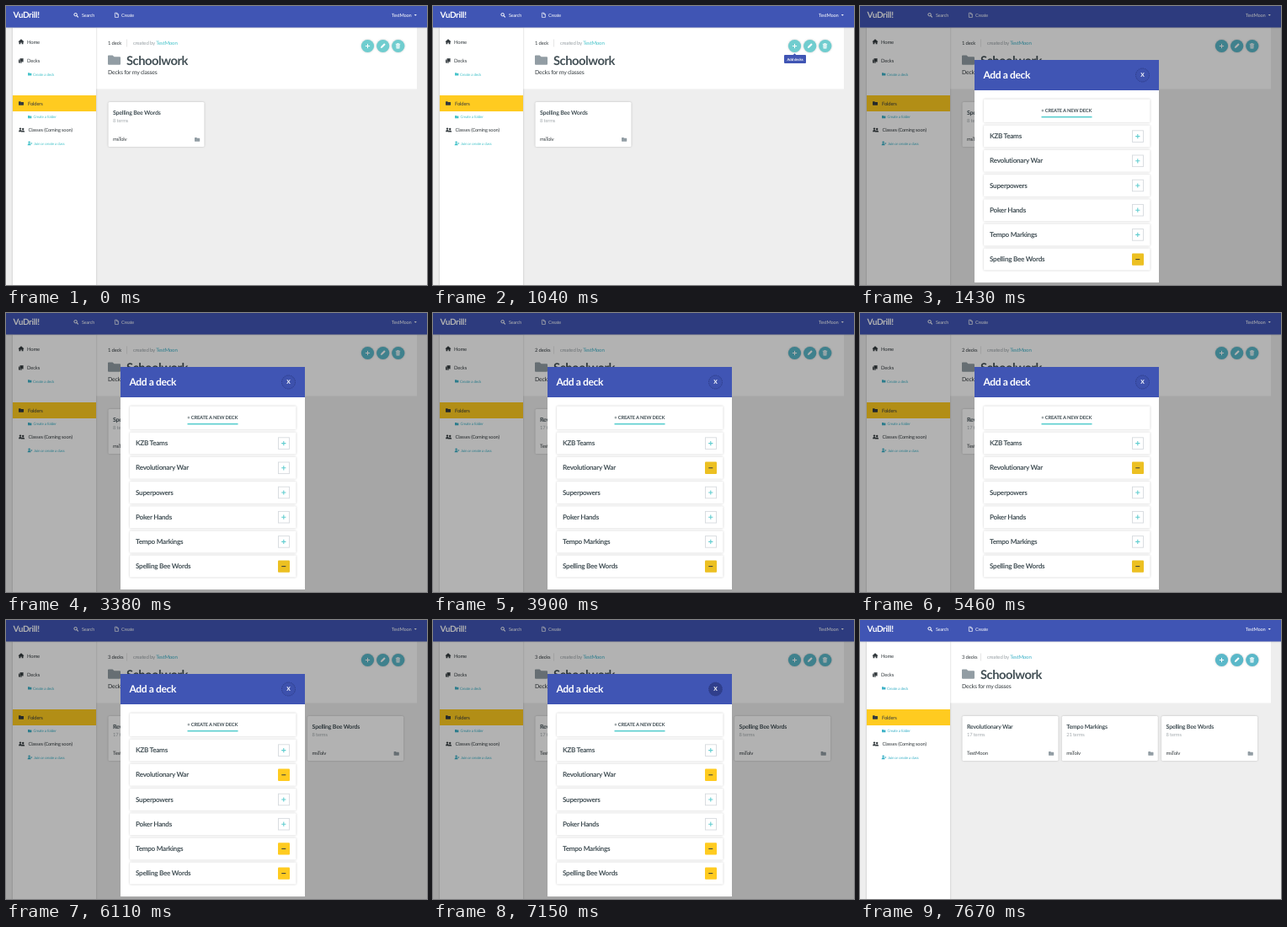
These frames come from a looping animation (500x331 px, 9750 ms). An HTML page:

```html
<!DOCTYPE html>
<html lang="en">
<head>
<meta charset="utf-8">
<title>Add decks to a folder</title>
<style>
  html, body { margin: 0; width: 100%; height: 100%; overflow: hidden; background: #eee; }
  svg { display: block; width: 100%; height: 100%; }
  text {
    font-family: Lato, sans-serif;
    letter-spacing: -.03em;
    text-rendering: geometricPrecision;
  }
</style>
</head>
<body>
<svg id="stage" viewBox="0 0 500 331"></svg>
<script>
const LOOP = 9750;
const BLUE = '#4055b4', INK = '#333a3e', SLATE = '#435056', GRAY = '#929da4', YELLOW = '#ffcb20';
const USER = 'TestMoon', AUTHOR = 'msTolv';

const DECKS = {
  war: { title: 'Revolutionary War', terms: 17, author: USER },
  tempo: { title: 'Tempo Markings', terms: 21, author: AUTHOR },
  bee: { title: 'Spelling Bee Words', terms: 8, author: AUTHOR }
};
const CHOICES = ['KZB Teams', 'Revolutionary War', 'Superpowers', 'Poker Hands',
  'Tempo Markings', 'Spelling Bee Words'];

function stateAt(t) {
  return {
    tooltip: t >= 1040 && t < 1430,
    modal: t >= 1430 && t < 7670,
    closeHover: t >= 7150,
    decks: t < 3510 ? ['bee'] : t < 5590 ? ['war', 'bee'] : ['war', 'tempo', 'bee'],
    teal: t < 1430 ? '#70cdcf' : '#5ab8c9',
    link: t < 1430 ? '#46c3ca' : '#3eb2c8',
    minus: t < 5980 ? '#ecc022' : YELLOW
  };
}

// Drawing helpers
const rect = (x, y, w, h, fill, extra = '') =>
  `<rect x="${x}" y="${y}" width="${w}" height="${h}" fill="${fill}" ${extra}/>`;
const circle = (x, y, r, fill, extra = '') =>
  `<circle cx="${x}" cy="${y}" r="${r}" fill="${fill}" ${extra}/>`;
const line = (d, color, width = 1) =>
  `<path d="${d}" fill="none" stroke="${color}" stroke-width="${width}"/>`;
const shape = (d, fill) => `<path d="${d}" fill="${fill}"/>`;
const text = (x, y, str, size, fill, weight = 400, anchor = 'start') =>
  `<text x="${x}" y="${y}" font-size="${size}" fill="${fill}" font-weight="${weight}" text-anchor="${anchor}">${str}</text>`;
const folder = (x, y, width, fill) =>
  `<path transform="translate(${x} ${y}) scale(${width / 16})" fill="${fill}" d="M1 0h5l2 2h7q1 0 1 1v8q0 1-1 1H1q-1 0-1-1V1q0-1 1-1z"/>`;
const plus = (x, y, r, color, width) =>
  line(`M${x - r} ${y}h${2 * r}M${x} ${y - r}v${2 * r}`, color, width);
const person = (x, y, fill) =>
  circle(x, y, 1.2, fill) + shape(`M${x - 2} ${y + 3.6}q0-2.1 2-2.1t2 2.1z`, fill);
const shadowed = (...parts) =>
  `<g style="filter:drop-shadow(0 .5px 1px rgba(0,0,0,.22))">${parts.join('')}</g>`;

function topBar() {
  return shadowed(rect(0, 0, 500, 25.5, BLUE)) +
    text(8.5, 13.8, 'VuDrill!', 10, '#fff', 700) +
    circle(82.6, 10.2, 1.7, 'none', 'stroke="#fff"') + line('M83.8 11.4l2 2', '#fff', 1.1) +
    text(90, 12.8, 'Search', 5.5, '#fff') +
    line('M129.4 8.2h2.4l1.6 1.6v3.6h-4zM131.6 8.2v1.8h1.8', '#fff', .7) +
    text(137, 12.8, 'Create', 5.5, '#fff') +
    text(458, 12.8, USER, 5.7, '#fff') +
    shape('M484.8 10h3l-1.5 1.8z', '#fff');
}

function sidebar(s) {
  return shadowed(rect(8, 25.5, 99, 310, '#fff')) +
    rect(8, 106, 99, 19, YELLOW) +
    shape('M14.6 42.2l3.4-3 3.4 3-.5.5-.4-.3v2.8h-1.8v-1.8h-1.4v1.8h-1.8v-2.8l-.4.3z', INK) +
    text(25, 44.6, 'Home', 5.9, INK) +
    rect(15, 63.6, 4, 4, INK, 'rx=".5"') +
    rect(16.4, 62, 4.4, 4.4, INK, 'rx=".5" stroke="#fff" stroke-width=".4"') +
    text(25, 67, 'Decks', 5.9, INK) +
    folder(26, 79.2, 4.4, s.link) + text(32, 82.6, 'Create a deck', 4.5, s.link) +
    folder(15, 113.2, 6, INK) + text(26, 117.6, 'Folders', 5.9, INK) +
    folder(26, 130, 4.4, s.link) + text(32.5, 133.4, 'Create a folder', 4.5, s.link) +
    person(17, 145.6, INK) + person(20.2, 146, INK) +
    text(26.5, 149.4, 'Classes (Coming soon)', 5.75, INK) +
    person(27.6, 161.6, s.link) + plus(30.2, 163, 1, s.link, .6) +
    text(33, 165.2, 'Join or create a class', 4.4, s.link);
}

function header(s) {
  const count = s.decks.length;
  const pencil = shape('M444.9 50.1l.5-2 3.8-3.8 1.5 1.5-3.8 3.8z', '#fff');
  const trash = shape('M462.8 44.8h1.7l.4-.7h1.2l.4.7h1.7v.9h-5.4zM463.3 46.2h4.4l-.3 4.4h-3.8z', '#fff') +
    line('M464.7 47v2.8M466.3 47v2.8', s.teal, .5);
  return rect(107, 25.5, 381, 73, '#fff') +
    text(121, 46, `${count} deck${count > 1 ? 's' : ''}`, 5.9, INK) +
    line('M143.5 39.5v9', '#ddd', .7) +
    text(151, 46, 'created by', 6.05, '#98a0a5') +
    text(178.3, 46, USER, 6.1, s.link) +
    folder(121, 58.4, 15, GRAY) +
    text(143, 69.6, 'Schoolwork', 14.7, SLATE, 700) +
    text(121, 81, 'Decks for my classes', 6.95, INK) +
    shadowed(...[429.5, 447.7, 465.8].map(x => circle(x, 47.5, 7.6, s.teal))) +
    plus(429.5, 47.5, 2.6, '#fff', 1) + pencil + trash;
}

function card(deck, i) {
  const x = 121.5 + i * 118.3;
  return shadowed(rect(x, 114, 114, 53, '#fff', 'rx="1.5"')) +
    text(x + 5.5, 128.6, deck.title, 7, SLATE, 700) +
    text(x + 5.5, 138.2, `${deck.terms} terms`, 5.8, '#a5abaf') +
    text(x + 5.5, 160, deck.author, 6, INK) +
    folder(x + 102.5, 156, 6.2, GRAY);
}

function tooltip() {
  return shape('M427.5 58.2l2-2 2 2z', BLUE) +
    rect(417, 58, 26, 10, BLUE, 'rx="1"') +
    text(430, 64.6, 'Add decks', 4.4, '#fff', 700, 'middle');
}

function choice(title, i, s) {
  const y = 154.6 + i * 29.2;
  const added = s.decks.some(id => DECKS[id].title === title);
  const button = added
    ? rect(323, y - 7.2, 14, 14.4, s.minus, 'rx="1"') + line(`M327.3 ${y}h5`, INK, 1)
    : rect(323.5, y - 6.8, 13, 13.6, '#fff', 'stroke="#d6dade" stroke-width=".9"') +
      plus(329.8, y, 2.6, '#62cdd0', 1.1);
  return shadowed(rect(147, y - 13, 197.5, 26, '#fff', 'rx="1"')) +
    text(154, y + 2.6, title, 8.1, SLATE, 700) + button;
}

function modal(s) {
  return rect(0, 0, 500, 331, '#000', 'opacity=".3"') +
    rect(136, 64, 219, 264, '#fff') +
    rect(136, 64, 219, 36, BLUE) +
    text(146.5, 86, 'Add a deck', 12, '#fff', 700) +
    circle(335.5, 82, 8, s.closeHover ? '#303f8c' : '#3d51ad',
      'stroke="#2b397f" stroke-width=".8" stroke-dasharray="1.5 1"') +
    text(335.5, 84.4, 'X', 6.8, '#fff', 700, 'middle') +
    shadowed(rect(147, 110.5, 197.5, 27.5, '#fff', 'rx="1"')) +
    text(245.3, 125.8, '+ CREATE A NEW DECK', 5.8, SLATE, 700, 'middle') +
    rect(215.5, 130.8, 60, 1.7, '#5fcfd0') +
    CHOICES.map((title, i) => choice(title, i, s)).join('');
}

function scene(s) {
  return rect(0, 0, 500, 331, '#eee') + header(s) + sidebar(s) + topBar() +
    s.decks.map((id, i) => card(DECKS[id], i)).join('') +
    (s.tooltip ? tooltip() : '') + (s.modal ? modal(s) : '');
}

const stage = document.getElementById('stage');
let shown = '';
function frame() {
  const state = stateAt(performance.now() % LOOP);
  const key = JSON.stringify(state);
  if (key !== shown) {
    stage.innerHTML = scene(state);
    shown = key;
  }
  requestAnimationFrame(frame);
}
frame();
</script>
</body>
</html>
```
